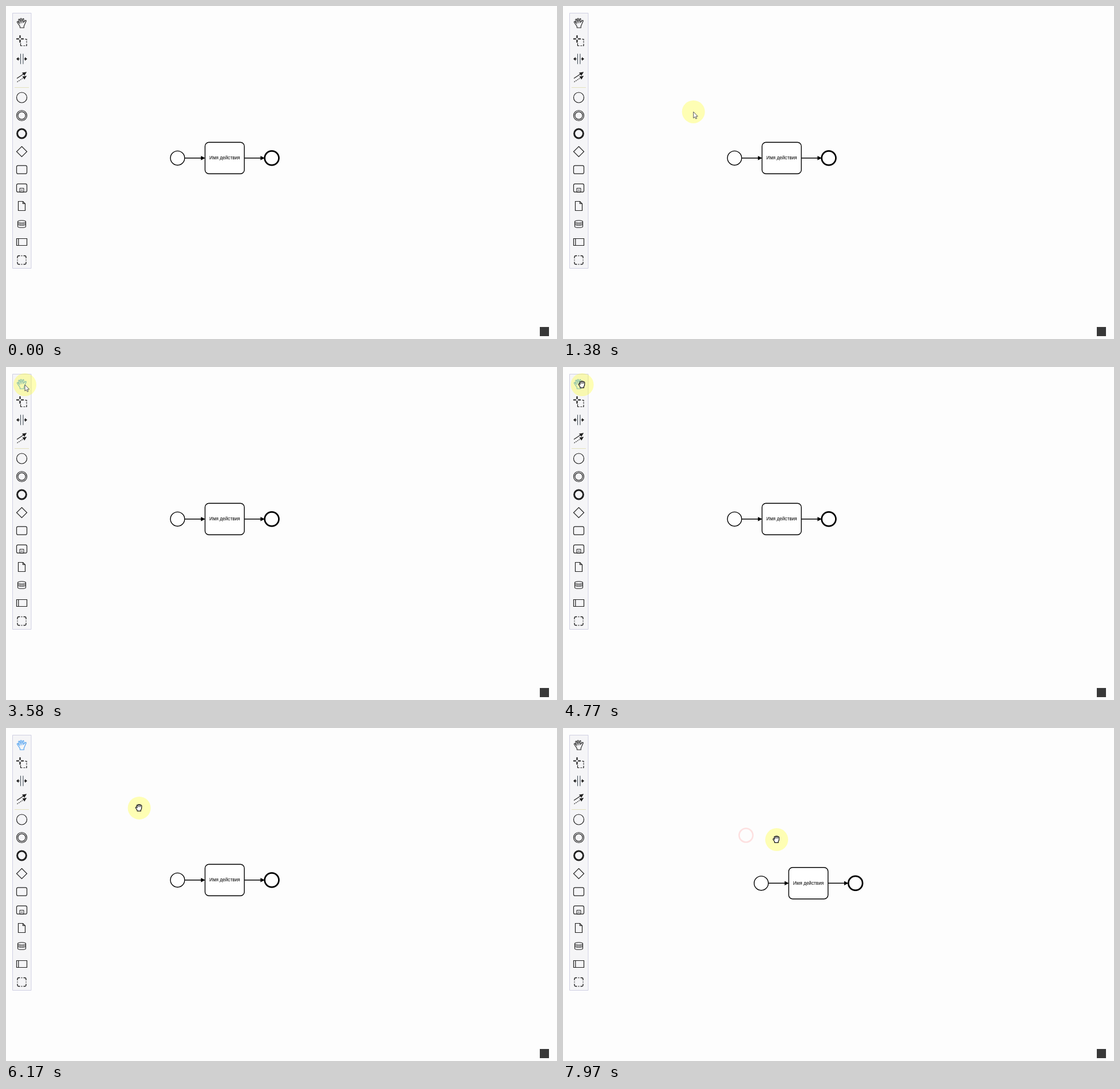
Animation, 962 px wide and 582 px high, one loop 7.99 s. Source, as an HTML page with a canvas:

```html
<!DOCTYPE html>
<html lang="ru">
<head>
<meta charset="utf-8">
<title>Редактор схем</title>
<style>
html, body { margin: 0; width: 100%; height: 100%; overflow: hidden; background: #fdfdfd; }
canvas { display: block; width: 962px; height: 582px; }
</style>
</head>
<body>
<canvas id="stage" width="962" height="582"></canvas>
<script>
const ctx = document.getElementById('stage').getContext('2d');
const LOOP = 7990, INK = '#202020', BLUE = '#4a9ff0';
const SHOW = 400, HOVER = 2780, CLICK = 4280, GRAB = 4490, PRESS = 7600;

// [time, x, y]
const pointer = [
  [400, 935, 241], [1100, 353, 204], [1380, 228, 185], [1940, 111, 109],
  [2460, 55, 52], [2780, 43, 42], [3580, 33, 31], [5210, 34, 31],
  [5310, 40, 33], [5490, 97.5, 58], [6050, 215, 130], [6890, 311, 182.5],
  [7100, 319.5, 187.5], [7600, 319.5, 187.5], [7730, 342, 190], [7990, 375.5, 195.5]
];
const drag = [[7600, 0, 0], [7730, 19, 0.8], [7970, 46.5, 5.5], [7990, 48.5, 5.7]];

// Smooth interpolation through the keys without overshoot.
function track(keys, t) {
  const last = keys.length - 1;
  if (t <= keys[0][0]) return keys[0].slice(1);
  if (t >= keys[last][0]) return keys[last].slice(1);
  let i = 0;
  while (t >= keys[i + 1][0]) i++;
  const h = keys[i + 1][0] - keys[i][0], u = (t - keys[i][0]) / h;
  return [1, 2].map(c => {
    const slope = k => (keys[k + 1][c] - keys[k][c]) / (keys[k + 1][0] - keys[k][0]);
    const tangent = k => {
      if (k === 0) return slope(0);
      if (k === last) return slope(last - 1);
      const a = slope(k - 1), b = slope(k);
      return a * b <= 0 ? 0 : 2 * a * b / (a + b);
    };
    const a = keys[i][c], b = keys[i + 1][c], u2 = u * u, u3 = u2 * u;
    return a + (b - a) * (3 * u2 - 2 * u3)
      + h * (tangent(i) * (u3 - 2 * u2 + u) + tangent(i + 1) * (u3 - u2));
  });
}

function stroke(path, width = 1.2, color = INK) {
  ctx.lineWidth = width;
  ctx.strokeStyle = color;
  ctx.stroke(path);
}

function fill(path, color = INK) {
  ctx.fillStyle = color;
  ctx.fill(path);
}

function circle(x, y, r) {
  const p = new Path2D();
  p.arc(x, y, r, 0, 7);
  return p;
}

function box(x, y, w, h, r = 0) {
  const p = new Path2D();
  p.roundRect(x, y, w, h, r);
  return p;
}

function at(x, y, draw) {
  ctx.save();
  ctx.translate(x, y);
  draw();
  ctx.restore();
}

const HAND = new Path2D('M-3 8.5L-3.2 5.8C-5.5 3-7 .5-8 -1C-8.4 -2.6-6.8 -2.8-6 -1.6' +
  'L-4.2 .6L-5.7 -5C-5.9 -6.8-4.2 -7.2-3.6 -5.5L-2.2 -1.4L-2.3 -6.8C-2.2 -8.4-.4 -8.4-.2 -6.8' +
  'L.3 -1.6L1.6 -6.4C2.2 -8 3.9 -7.5 3.6 -6L2.8 -.8L5.8 -4C7 -5 8.3 -4 7.5 -2.6' +
  'C5.8 0 5.4 3 3.8 5.5L3.8 8.5Z');
const ARROW = new Path2D('M0 0V11L2.5 8.7L4.2 12.3L5.9 11.5L4.3 8H7.6Z');
const FIST = new Path2D('M-3 6L-3.4 3.7L-5.6 .8C-6.4 -.8-4.8 -1.5-4 -.6L-3.2 .2L-3.9 -3.2' +
  'C-4 -4.8-2.3 -5-1.8 -3.7C-1.9 -6 0 -6.2.4 -4.4C.8 -6.1 2.5 -5.8 2.6 -4' +
  'C3.5 -5 5 -4.2 4.8 -2.7L4.5 1.8L3.3 4V6Z');

const icons = [
  [61, () => {
    stroke(new Path2D('M-9.5 -3.5H-4.6M-1.4 -3.5H3.5M-3 -9.8V-5M-3 -2V3'), 2.2);
    stroke(new Path2D('M-2 4V8.5H1M3 8.5H5.5M7 8.5H8.5V5M8.5 3V.5M8.5 -1V-3H5.5'));
  }],
  [92.5, () => {
    stroke(new Path2D('M-2 -9V9M2.4 -9V9'), 1.1, '#45505a');
    stroke(new Path2D('M-8 0H-3.8M4.2 0H8'), 1.5);
    fill(new Path2D('M-9.5 0L-5.5 -3.2V3.2ZM9.5 0L5.5 -3.2V3.2Z'));
  }],
  [123.5, () => {
    stroke(new Path2D('M-8.5 3L4 -5.2'));
    fill(new Path2D('M8.7 -8.3L4.5 -1.4L.5 -7Z'));
    ctx.setLineDash([1.8, 1.4]);
    stroke(new Path2D('M-8 9.3L4 1.5'));
    ctx.setLineDash([]);
    fill(new Path2D('M8.7 -1.5L4.7 5L1 -.3Z'));
  }],
  [160, () => stroke(circle(0, 0, 9))],
  [191.5, () => { stroke(circle(0, 0, 9)); stroke(circle(0, 0, 6.7)); }],
  [223, () => stroke(circle(0, 0, 7.9), 3)],
  [254.5, () => stroke(new Path2D('M0 -9L9 0L0 9L-9 0Z'))],
  [286, () => stroke(box(-9, -7.2, 18, 14.4, 2.5))],
  [318, () => {
    stroke(box(-9, -7.2, 18, 14.4, 2.5));
    stroke(box(-3.5, .5, 7, 6.7), 1);
    stroke(new Path2D('M-1.8 3.8H1.8'), 1);
  }],
  [349.5, () => stroke(new Path2D('M-6 -8H2L6 -4V8H-6ZM2 -8V-4H6'))],
  [381, () => {
    stroke(new Path2D('M-7 -4V4.2C-7 7 7 7 7 4.2V-4C7 -7-7 -7-7 -4'), 1.1);
    for (const y of [-4, -1.8, .4]) stroke(new Path2D(`M-7 ${y}C-7 ${y + 2.8} 7 ${y + 2.8} 7 ${y}`), 1);
  }],
  [412.5, () => { stroke(box(-9, -6, 18, 12)); stroke(new Path2D('M-5.7 -6V6')); }],
  [444, () => {
    stroke(new Path2D('M-7.5 -3V-5Q-7.5 -7.5-5 -7.5H-3M3 -7.5H5Q7.5 -7.5 7.5 -5V-3' +
      'M7.5 3V5Q7.5 7.5 5 7.5H3M-3 7.5H-5Q-7.5 7.5-7.5 5V3' +
      'M-.8 -7.5H.8M-.8 7.5H.8M-7.5 -.8V.8M7.5 -.8V.8'), 1.3);
  }]
];

function drawPalette(t) {
  const panel = box(11.5, 12.5, 32.5, 446);
  fill(panel, '#f5f5f7');
  stroke(panel, 1, '#cfcfe2');
  stroke(new Path2D('M15 142.5H40'), 1, '#e4e2bd');
  at(27.5, 29.5, () => stroke(HAND, 1.1, t >= HOVER && t < PRESS ? BLUE : INK));
  for (const [y, draw] of icons) at(27.5, y, draw);
}

function drawFlow(x1, x2) {
  stroke(new Path2D(`M${x1} 0H${x2 - 3}`), 1.4, '#000');
  fill(new Path2D(`M${x2} 0L${x2 - 7.5} -3.8V3.8Z`), '#000');
}

function drawDiagram() {
  const start = circle(-82.3, 0, 12.4), end = circle(82.2, 0, 12.4);
  const task = box(-34.3, -27.5, 68.6, 55, 6.9);
  for (const p of [start, end, task]) fill(p, '#fff');
  stroke(start, 1.4, '#000');
  stroke(end, 2.75, '#000');
  stroke(task, 1.4, '#000');
  drawFlow(-69.5, -34);
  drawFlow(34.3, 70);
  ctx.fillStyle = '#000';
  ctx.font = '8.23px "Liberation Sans", Arial, sans-serif';
  ctx.textAlign = 'center';
  ctx.fillText('Имя действия', 0, 2.5);
}

function drawRing(age, x, y) {
  const p = age / 450;
  if (p < 0 || p >= 1) return;
  ctx.globalAlpha = 0.8 * (1 - p);
  stroke(circle(x, y, 12 * Math.min(1, 0.35 + age / 110)), 2.6, '#f33');
  ctx.globalAlpha = 1;
}

function drawPointer(t) {
  if (t < SHOW) return;
  const [x, y] = track(pointer, t);
  fill(circle(x, y, 20), 'rgba(255,255,0,0.29)');
  drawRing(t - CLICK, 33, 31);
  drawRing(t - PRESS, 319.5, 187.5);
  const hand = t >= GRAB;
  at(hand ? x - 0.5 : x, hand ? y - 0.7 : y, () => {
    const shape = hand ? FIST : ARROW;
    ctx.lineJoin = 'round';
    fill(shape, '#fff');
    stroke(shape, hand ? 1.2 : 0.9, hand ? '#111' : '#444');
    if (hand) stroke(new Path2D('M-1.7 -3.5V-1M.5 -4V-1M2.6 -3.7V-1'), 0.9, '#111');
  });
}

function render(t) {
  fill(box(0, 0, 962, 582), '#fdfdfd');
  const [dx, dy] = track(drag, t);
  at(381.8 + dx, 265.8 + dy, drawDiagram);
  drawPalette(t);
  fill(box(932, 561, 16, 16), '#383838');
  drawPointer(t);
}

const begin = performance.now();
function tick() {
  render((performance.now() - begin) % LOOP);
  requestAnimationFrame(tick);
}
tick();
</script>
</body>
</html>
```
